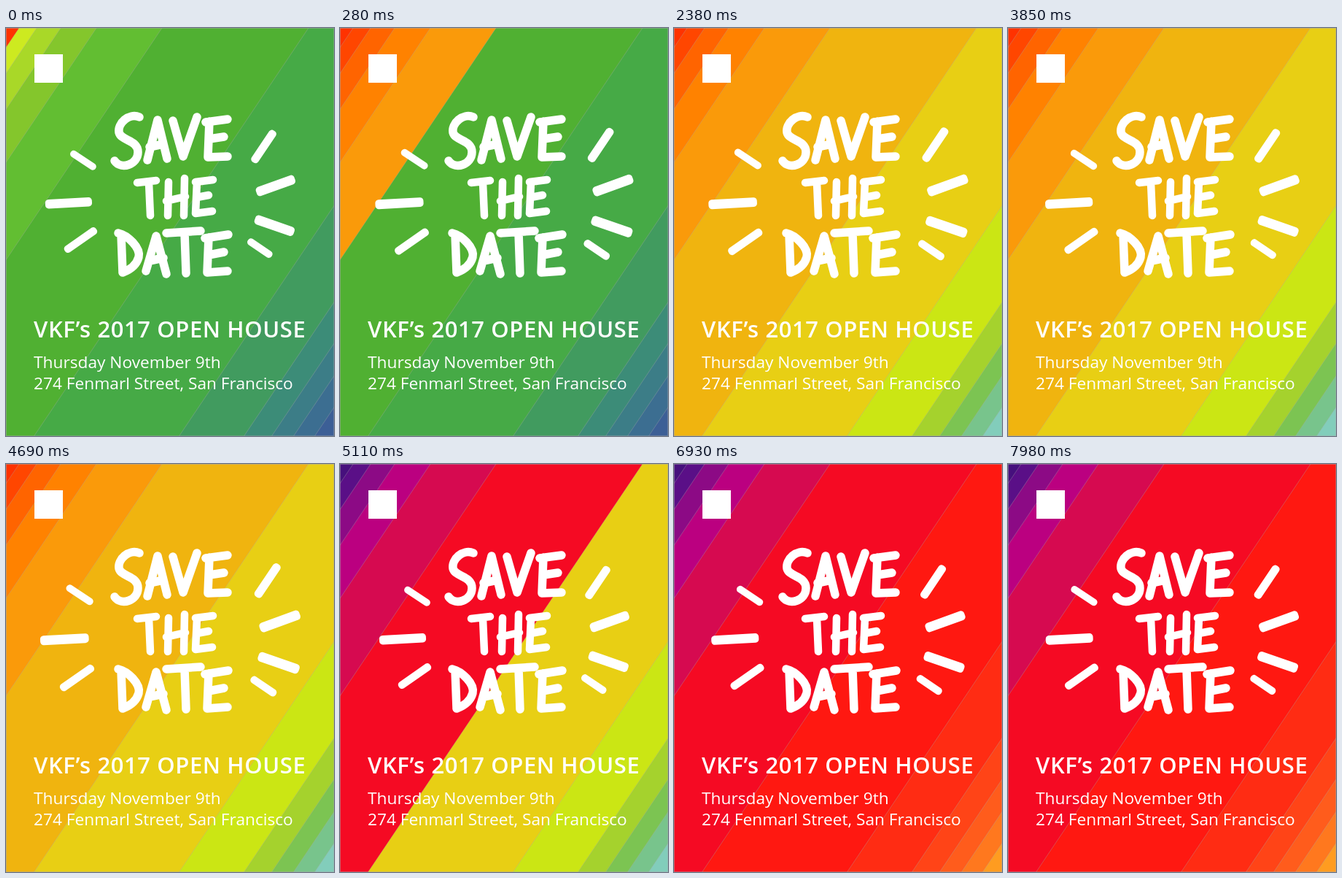
An HTML page that plays this animation: 450 by 559 pixels, repeating every 8 s.

```html
<!DOCTYPE html>
<html lang="en">
<head>
<meta charset="utf-8">
<title>Save the date</title>
<style>
  html, body { margin: 0; width: 100%; height: 100%; overflow: hidden; }
  svg { display: block; width: 450px; height: 559px; }
  text { fill: #fff; font-family: "Open Sans", "Noto Sans", sans-serif; }
  .title { font-size: 31px; font-weight: 600; letter-spacing: 0.6px; }
  .detail { font-size: 22.7px; }
  .edge { stroke: #aaa; stroke-opacity: 0.35; }
  .lettering { fill: none; stroke: #fff; stroke-linecap: round; stroke-linejoin: round; }
</style>
</head>
<body>
<svg viewBox="0 0 450 559">
  <g id="bands" class="edge"></g>
  <rect class="edge" x="0.5" y="0.5" width="449" height="558" fill="none"/>
  <rect x="39" y="36" width="39" height="39" fill="#fff"/>
  <g class="lettering" stroke-width="11.5">
    <!-- SAVE -->
    <path d="M183 122C168 116 153 131 155 143C158 155 181 153 181 170C181 187 158 195 149 182"/>
    <path d="M194 181L208 126L221 179M197 163L216 159"/>
    <path d="M229 127L243 176L262 122"/>
    <path d="M279 128L277 177L304 176M274 129L304 125M279 152L299 149"/>
    <!-- THE -->
    <path stroke-width="10.5" d="M180 212L206 209M196 212L198 257"/>
    <path stroke-width="10.5" d="M223 211L222 257M245 206L244 257M220 237L246 231"/>
    <path stroke-width="10.5" d="M262 211L260 254L283 251M260 211L284 208M262 232L278 229"/>
    <!-- DATE -->
    <path d="M158 283L160 335M154 281C167 284 185 301 182 314C179 325 171 331 160 335"/>
    <path d="M192 333L206 285L220 337M197 319L216 315"/>
    <path d="M220 281L267 278M245 281L247 336"/>
    <path d="M278 287L276 335L304 333M273 288L305 283M278 311L299 307"/>
  </g>
  <g id="rays" fill="#fff"></g>
  <text class="title" x="38" y="424">VKF’s 2017 OPEN HOUSE</text>
  <text class="detail" x="38" y="466">Thursday November 9th</text>
  <text class="detail" x="38" y="494.5">274 Fenmarl Street, San Francisco</text>
</svg>
<script>
const LOOP = 8000, STEP = 70;
const SLOPE = 1.485;
const PULSE = { period: 1025, phase: 0.04, size: 0.047, x: 225, y: 228 };

// Where each diagonal band ends along the top edge.
const ENDS = [18, 42, 75, 124, 214, 415, 614, 703, 741, 771, 800, 840];

const PALETTES = [
  { start: -Infinity, colors: "#e1f01e #cdea20 #a9d828 #84c62c #62be32 #50b032 #46aa46 #419b5f #3c8c78 #3c7d87 #3c6e91 #3c5f96".split(" ") },
  { start: 0, colors: "#ff3200 #ff4600 #ff6400 #ff8200 #fa9a0a #f0b40f #e8cf14 #cbe614 #a5d22d #7cc452 #78c48c #82cdbb".split(" ") },
  { start: 4760, colors: "#46107d #5a0f87 #8c0a85 #bb0080 #d60a50 #f50a23 #ff1811 #ff2c13 #ff4417 #ff5c1c #ff781e #ff9c20".split(" ") }
];

// Each ray: x1, y1, x2, y2, thickness.
const RAYS = [
  [89, 170, 123, 192.5, 9.5],
  [54, 241.5, 118, 238, 12.5],
  [81, 305.5, 124, 275.5, 10.5],
  [368, 141, 339, 184, 11],
  [343.5, 225.5, 396, 206.5, 13],
  [341.5, 261.5, 395, 280, 13],
  [332, 290.5, 364.5, 312.5, 10]
];

const bandGroup = document.getElementById("bands");
const rayGroup = document.getElementById("rays");

function add(parent, tag, attrs) {
  const el = document.createElementNS(parent.namespaceURI, tag);
  for (const key in attrs) el.setAttribute(key, attrs[key]);
  return parent.appendChild(el);
}

// Nested triangles, largest first, so the smaller ones cover them without seams.
const bands = ENDS.slice().reverse().map(end =>
  add(bandGroup, "path", { d: `M0 0H${end}L0 ${end * SLOPE}Z` })
).reverse();

for (const [x1, y1, x2, y2, w] of RAYS) {
  const angle = Math.atan2(y2 - y1, x2 - x1) * 180 / Math.PI;
  add(rayGroup, "rect", {
    y: -w / 2, width: Math.hypot(x2 - x1, y2 - y1), height: w, rx: 4.5,
    transform: `translate(${x1} ${y1}) rotate(${angle})`
  });
}

function draw(time) {
  const t = Math.floor(time % LOOP / STEP) * STEP;
  bands.forEach((band, i) => {
    const palette = PALETTES.filter(p => t >= p.start + i * STEP).pop();
    band.setAttribute("fill", palette.colors[i]);
  });
  const turn = 2 * Math.PI * (PULSE.phase + t / PULSE.period);
  const scale = 1 + PULSE.size * (1 - Math.cos(turn)) / 2;
  rayGroup.setAttribute("transform",
    `translate(${PULSE.x} ${PULSE.y}) scale(${scale}) translate(${-PULSE.x} ${-PULSE.y})`);
}

const begin = performance.now();
function tick() {
  draw(performance.now() - begin);
  requestAnimationFrame(tick);
}
tick();
</script>
</body>
</html>
```
